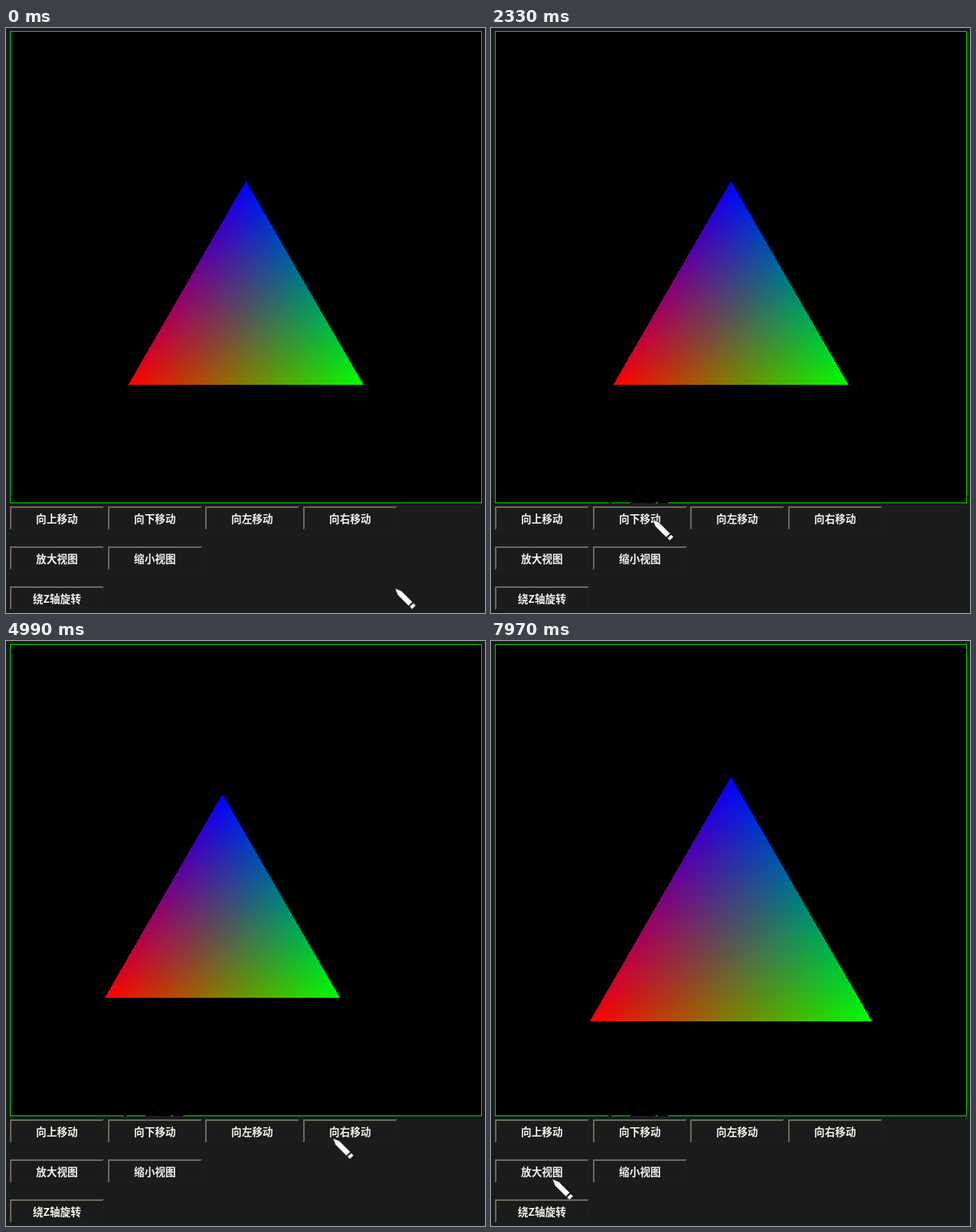
These frames come from a looping animation (611 by 746 pixels, 8000 ms). An HTML page:

```html
<!DOCTYPE html>
<html lang="zh-CN">
<head>
<meta charset="utf-8">
<title>三角形变换</title>
<style>
  html, body { margin: 0; width: 100%; height: 100%; overflow: hidden; background: #1a1b1c; }
  #stage { position: absolute; left: 0; top: 0; width: 611px; height: 746px; overflow: hidden; }
  #view {
    position: absolute; left: 5px; top: 4px; width: 600px; height: 600px;
    border: 1px solid #00d200; background: #000;
  }
  svg { position: absolute; left: 0; top: 0; overflow: visible; }
  #triangle { isolation: isolate; transform-origin: 306px 305px; }
  #triangle use { mix-blend-mode: screen; shape-rendering: crispEdges; }
  .button {
    position: absolute; box-sizing: border-box; width: 120px; height: 30px;
    border: 2px solid; border-color: #6f675c #1d1d1c #1d1d1c #6f675c; background: #1a1c1c;
    color: #f4f2ef; text-align: center; white-space: nowrap;
    font: bold 13.333px/27px "Noto Sans CJK SC", "Noto Sans CJK", sans-serif;
  }
</style>
</head>
<body>
<div id="stage">
  <div id="view"></div>
  <svg width="611" height="746">
    <defs>
      <polygon id="shape" points="306,195 456,455 156,455"/>
      <linearGradient id="red" gradientUnits="userSpaceOnUse" x1="156" y1="455" x2="381" y2="325">
        <stop stop-color="#f00"/><stop offset="1"/>
      </linearGradient>
      <linearGradient id="green" gradientUnits="userSpaceOnUse" x1="456" y1="455" x2="231" y2="325">
        <stop stop-color="#0f0"/><stop offset="1"/>
      </linearGradient>
      <linearGradient id="blue" gradientUnits="userSpaceOnUse" x1="306" y1="195" x2="306" y2="455">
        <stop stop-color="#00f"/><stop offset="1"/>
      </linearGradient>
    </defs>
    <g id="triangle">
      <use href="#shape" fill="url(#red)"/>
      <use href="#shape" fill="url(#green)"/>
      <use href="#shape" fill="url(#blue)"/>
    </g>
    <g id="trail">
      <path d="M184 590L204 606" stroke="#040406" stroke-width="4"/>
      <path d="M150 605.5h4M178 605.5h32M213 605.5h13" stroke="#0c0d0e"/>
    </g>
  </svg>
  <div id="buttons"></div>
  <svg id="cursor" width="28" height="28" fill="#fff" stroke="#111" stroke-width=".6">
    <path d="M0 0L8.5 3.5 22.5 17.5 17.5 22.5 3.5 8.5Z"/>
    <path d="M23.6 18.9L26.8 22 22 26.8 18.9 23.6Z"/>
  </svg>
</div>
<script>
const LOOP = 8000;   // ms
const GLIDE = 700;   // longest pointer move between two stops
const HOLD = 100;    // how long a button stays down
const SHIFT = 30;    // px per move click
const ZOOM = 1.2;

const $ = id => document.getElementById(id);

// Each step is [ms, style]; the last one holds until the loop restarts.
function play(element, steps, easing) {
  const frames = steps.map(([ms, style]) => ({ offset: ms / LOOP, easing, ...style }));
  frames.push({ ...frames[frames.length - 1], offset: 1 });
  element.animate(frames, { duration: LOOP, iterations: Infinity });
}

const move = (x, y, scale = 1) => ({ transform: `translate(${x}px, ${y}px) scale(${scale})` });

const RAISED = { borderColor: '#6f675c #1d1d1c #1d1d1c #6f675c' };
const PRESSED = { borderColor: '#1d1d1c #6f675c #6f675c #1d1d1c' };

const rows = [
  [
    { label: '向上移动', click: 1710, act: v => { v.y -= SHIFT; } },
    { label: '向下移动', click: 2290, act: v => { v.y += SHIFT; } },
    { label: '向左移动', click: 3870, act: v => { v.x -= SHIFT; } },
    { label: '向右移动', click: 5110, act: v => { v.x += SHIFT; } },
  ],
  [
    { label: '放大视图', click: 7770, act: v => { v.scale *= ZOOM; } },
    { label: '缩小视图' },
  ],
  [{ label: '绕Z轴旋转' }],
];

// Every click changes the view, and the triangle jumps to the new pose.
const view = { x: 0, y: 0, scale: 1 };
const poses = [[0, move(0, 0)]];

rows.forEach((row, r) => row.forEach(({ label, click, act }, c) => {
  const button = document.createElement('div');
  button.className = 'button';
  button.textContent = label;
  button.style.left = Math.round(5 + c * 124.67) + 'px';
  button.style.top = 610 + r * 51 + 'px';
  $('buttons').append(button);
  if (!click) return;
  play(button, [[0, RAISED], [click - HOLD, PRESSED], [click, RAISED]], 'step-end');
  act(view);
  poses.push([click, move(view.x, view.y, view.scale)]);
}));

play($('triangle'), poses, 'step-end');
play($('trail'), [[0, { opacity: 0 }], [640, { opacity: 1 }]], 'step-end');

// The pointer rests at each stop and glides so as to arrive at the next on time.
const stops = [
  { at: 0, x: 505, y: 718 },
  { at: 600, x: 180, y: 589 },
  { at: 1330, x: 91, y: 631 },
  { at: 2330, x: 206, y: 627 },
  { at: 3270, x: 313, y: 626 },
  { at: 5000, x: 418, y: 634 },
  { at: 6350, x: 40, y: 668 },
  { at: 7510, x: 78, y: 686 },
];

const path = stops.flatMap(({ at, x, y }, i) => {
  const next = stops[i + 1];
  const pose = move(x, y);
  return next ? [[at, pose], [Math.max(at, next.at - GLIDE), pose]] : [[at, pose]];
});
play($('cursor'), path, 'linear');
</script>
</body>
</html>
```
